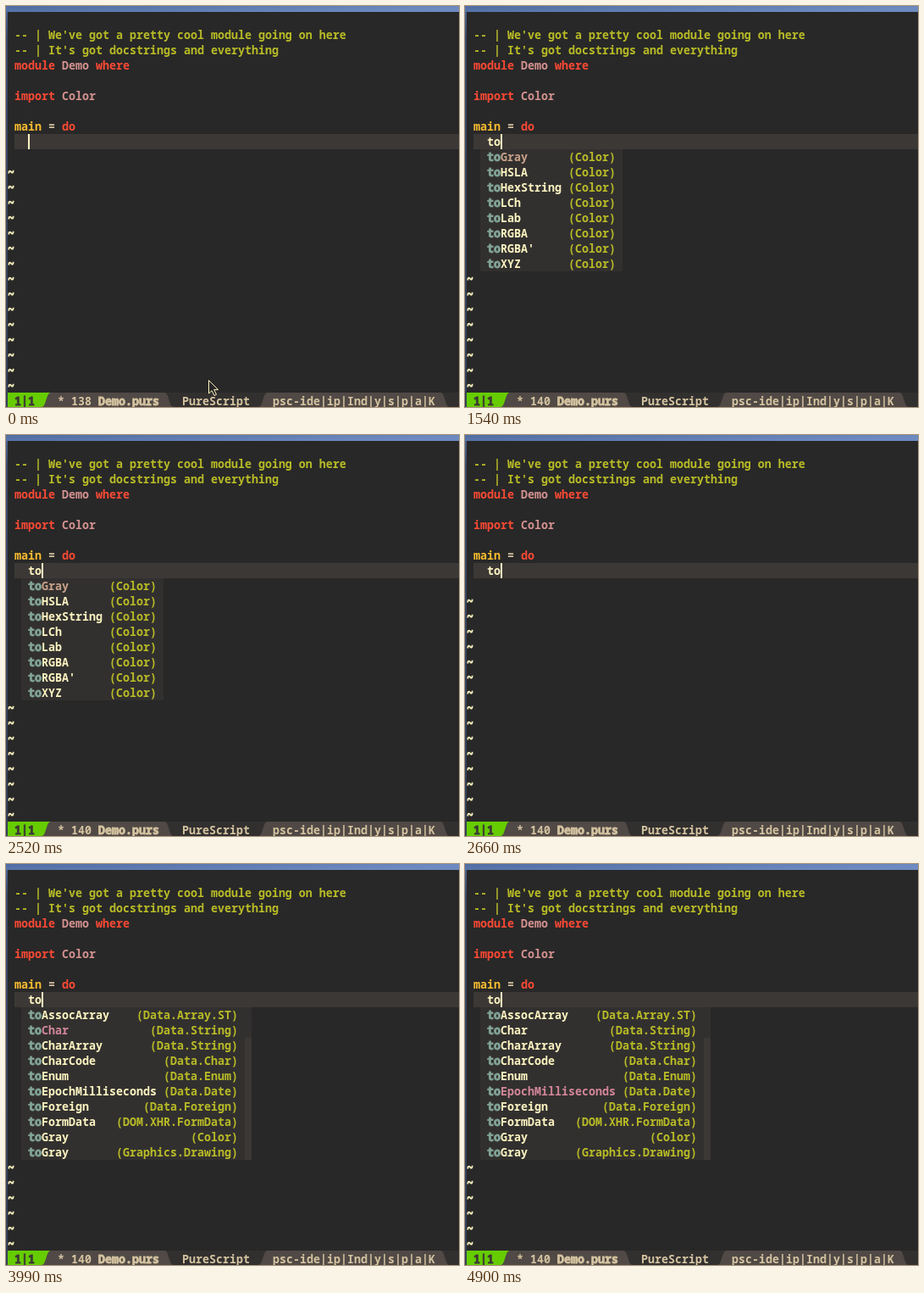
Animation, 535 px wide and 473 px high, one loop 4970 ms. Source, as an HTML page:

```html
<!DOCTYPE html>
<html lang="en">
<head>
<meta charset="utf-8">
<title>Completion demo</title>
<style>
  html, body { margin: 0; width: 100%; height: 100%; overflow: hidden; background: #282828; }
  svg { display: block; width: 535px; height: 473px; }
  text { font: 600 13.333px "Noto Sans Mono", monospace; white-space: pre; font-variant-ligatures: none; stroke-width: .8px; }
</style>
</head>
<body>
<svg id="stage" viewBox="0 0 535 473">
  <defs>
    <linearGradient id="title" x2="1" y2=".3">
      <stop stop-color="#4f6da2"/>
      <stop offset="1" stop-color="#6d8bc1"/>
    </linearGradient>
    <linearGradient id="edge" x2="0" y2="1">
      <stop stop-color="#50699a"/>
      <stop offset=".08" stop-color="#3b4a68"/>
      <stop offset="1" stop-color="#344058"/>
    </linearGradient>
  </defs>
</svg>
<script>
const LOOP = 4970, COL = 8, ROW = 18, TOP = 7, BAR = 456;
const C = {
  bg: '#282828', line: '#3c3836', popup: '#32302f', bar: '#504945',
  fg: '#fdf4c1', soft: '#d5c4a1', green: '#b8bb26', red: '#fb4934',
  yellow: '#fabd2f', blue: '#83a598', type: '#d3918f', pick: '#d3869b'
};
const stage = document.getElementById('stage');

function add(tag, attrs, parent = stage) {
  const el = document.createElementNS('http://www.w3.org/2000/svg', tag);
  for (const key in attrs) el.setAttribute(key, attrs[key]);
  return parent.appendChild(el);
}
const rect = (x, y, width, height, fill, parent) =>
  add('rect', { x, y, width, height, fill }, parent);
const path = (d, fill, extra) => add('path', { d, fill, ...extra });
function label(x, y, str, fill, parent, bold) {
  const el = add('text', { x, y, fill, stroke: bold ? fill : 'none' }, parent);
  el.textContent = str;
  return el;
}
const rowTop = row => TOP + row * ROW;
const write = (x, row, str, fill, parent, bold) =>
  label(x, rowTop(row) + 14, str, fill, parent, bold);
const show = (el, on) => el.setAttribute('visibility', on ? 'visible' : 'hidden');

// Editor window
rect(0, 0, 535, 473, C.bg);
rect(0, 0, 2, 473, 'url(#edge)');
rect(0, 0, 535, 7, 'url(#title)');
rect(10, rowTop(8), 525, ROW, C.line);

write(10, 1, "-- | We've got a pretty cool module going on here", C.green);
write(10, 2, "-- | It's got docstrings and everything", C.green);
write(10, 3, 'module', C.red);
write(66, 3, 'Demo', C.type);
write(106, 3, 'where', C.red);
write(10, 5, 'import', C.red);
write(66, 5, 'Color', C.type);
write(10, 7, 'main', C.yellow);
write(50, 7, '=', C.soft);
write(66, 7, 'do', C.red);

const typed = write(26, 8, '', C.fg);
const caret = rect(26, rowTop(8), 2, ROW, C.fg);
const tildes = [];
for (let row = 10; row < 25; row++) tildes.push(write(2, row, '~', C.fg, stage, true));

// Status bar: segments with wave-shaped ends
const rise = x => `${x + 11},${BAR}C${x + 5},${BAR} ${x + 6},473 ${x},473`;
const fall = x => `${x},${BAR}C${x + 6},${BAR} ${x + 5},473 ${x + 11},473`;
const pill = (a, b) => `M${rise(a)}L${b + 11},473C${b + 5},473 ${b + 6},${BAR} ${b},${BAR}Z`;
rect(2, BAR, 533, 17, C.popup);
path(`M2,${BAR}L${fall(187)}H2Z`, C.bar);
path(`M2,${BAR}L${rise(42)}H2Z`, '#66cc00');
const modesPill = path('', C.bar);
label(10, 471, '1|1', C.line, stage, true);
label(61, 471, '*', C.soft);
const size = label(77, 471, '', C.soft);
label(109, 471, 'Demo.purs', C.soft, stage, true);
label(208, 471, 'PureScript', C.soft);
const modes = label(315, 471, '', C.soft);

const pointer = path('M239.5,441.5V457L243,453.8L246,459.5L248.5,458.3L245.7,452.6H250.5Z',
  C.bg, { stroke: C.fg, 'stroke-width': 1 });

// Completion menus: each item is "name module"
function menu(items, cols, scrollbar, pick) {
  const group = add('g', {});
  const top = rowTop(9), height = items.length * ROW;
  rect(18, top, (cols + 2 + (scrollbar ? 1 : 0)) * COL, height, C.popup, group);
  const right = 26 + cols * COL;
  if (scrollbar) rect(right + COL, top + 2 * ROW, COL, height - 2 * ROW, C.line, group);
  const names = items.map((item, i) => {
    const [name, mod] = item.split(' ');
    const note = `(${mod})`;
    write(26, 9 + i, 'to', C.blue, group, true);
    write(right - note.length * COL, 9 + i, note, C.green, group);
    return write(42, 9 + i, name, C.fg, group);
  });
  return { group, names, pick, rows: items.length };
}
const menus = [
  menu(['Gray', 'HSLA', 'HexString', 'LCh', 'Lab', 'RGBA', "RGBA'", 'XYZ']
    .map(name => name + ' Color'), 19, false, '#c9a28a'),
  menu(['AssocArray Data.Array.ST', 'Char Data.String', 'CharArray Data.String',
    'CharCode Data.Char', 'Enum Data.Enum', 'EpochMilliseconds Data.Date',
    'Foreign Data.Foreign', 'FormData DOM.XHR.FormData', 'Gray Color',
    'Gray Graphics.Drawing'], 31, true, C.pick)
];

// Each step carries over whatever it does not change
const steps = [
  { at: 0, text: '', menu: -1, sel: 0, search: false },
  { at: 910, text: 't' },
  { at: 1330, text: 'to' },
  { at: 1540, menu: 0 },
  { at: 1820, search: true },
  { at: 2520, search: false },
  { at: 2660, menu: -1 },
  { at: 3360, menu: 1 },
  { at: 3990, sel: 1 },
  { at: 4340, sel: 2 },
  { at: 4480, sel: 3 },
  { at: 4690, sel: 4 },
  { at: 4900, sel: 5 }
];
steps.forEach((step, i) => { steps[i] = { ...steps[i - 1], ...step }; });

function render(s) {
  typed.textContent = s.text;
  caret.setAttribute('x', 26 + s.text.length * COL);
  size.textContent = 138 + s.text.length;
  show(pointer, s.text === '');
  modes.textContent = (s.search ? 'Search: ""|' : '') + 'psc-ide|ip|Ind|y|s|p|a|K';
  modesPill.setAttribute('d', pill(298, s.search ? 601 : 513));
  menus.forEach((m, i) => {
    show(m.group, i === s.menu);
    m.names.forEach((name, n) => name.setAttribute('fill', n === s.sel ? m.pick : C.fg));
  });
  const covered = s.menu < 0 ? 0 : menus[s.menu].rows - 1;
  tildes.forEach((tilde, i) => show(tilde, i >= covered));
}

const start = performance.now();
let current;
function tick() {
  const t = (performance.now() - start) % LOOP;
  const step = steps.findLast(s => s.at <= t) || steps[0];
  if (step !== current) render(current = step);
  requestAnimationFrame(tick);
}
tick();
</script>
</body>
</html>
```
